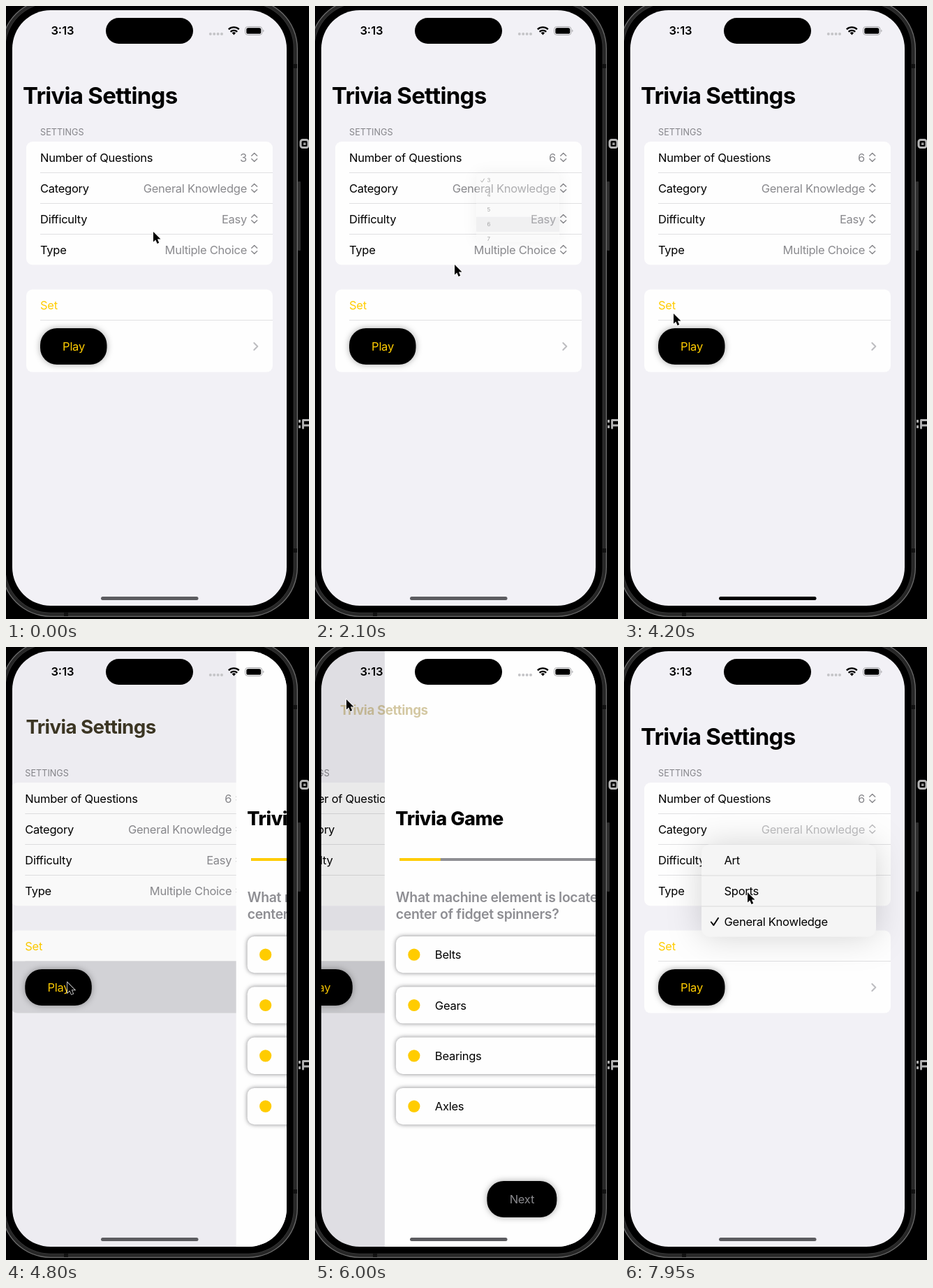
Recreate the animation shown at these times as an HTML page. Size 434x877 px, loop 8000 ms.

```html
<!DOCTYPE html>
<html lang="en">
<head>
<meta charset="utf-8">
<title>Trivia Settings</title>
<style>
  html, body { margin: 0; width: 100%; height: 100%; overflow: hidden; background: #000; }
  svg { display: block; width: 100vw; height: 100vh; }
  text {
    font: 400 16.5px Inter, "Open Sans", sans-serif;
    font-optical-sizing: none;
    letter-spacing: -.016em;
    white-space: pre;
  }
  .value, .muted { fill: #8a8a8e; }
  .accent { fill: #fc0; }
  .end { text-anchor: end; }
  .mid { text-anchor: middle; }
  .large { font-size: 33px; font-weight: 700; letter-spacing: -.022em; }
  .heading { font-size: 27px; font-weight: 800; }
  .question { font-size: 19.4px; font-weight: 600; fill: #8e8e93; }
  .caption { font-size: 12.6px; letter-spacing: .05px; fill: #85858a; }
  .clock { font-weight: 600; letter-spacing: 0; }
  .line { fill: none; stroke-linecap: round; stroke-linejoin: round; }
  .pill { filter: drop-shadow(0 0 5px rgba(0,0,0,.34)); }
  .answer { fill: #fefefe; filter: drop-shadow(0 0 3px rgba(100,100,104,.8)); }
  .plate { fill: #f5f5f5; filter: drop-shadow(0 0 24px rgba(0,0,0,.17)); }
</style>
</head>
<body>
<svg id="stage" viewBox="0 0 434 877"></svg>
<script>
const LOOP = 8000, STEP = 150;
const SCREEN = { x: 9, y: 6, w: 393, h: 852 };

// Markup helpers
const box = (x, y, w, h, r, fill, extra = '') =>
  `<rect x="${x}" y="${y}" width="${w}" height="${h}" rx="${r}" fill="${fill}" ${extra}/>`;
const text = (x, y, str, cls = '', extra = '') =>
  `<text x="${x}" y="${y}" class="${cls}" ${extra}>${str}</text>`;
const line = (d, color, width, extra = '') =>
  `<path class="line" d="${d}" stroke="${color}" stroke-width="${width}" ${extra}/>`;
const rule = (x, y, w, color = '#e0e0e2') => box(x, y, w, 1, 0, color);

const settingRow = (label, value, i) => {
  const y = 223 + i * 44;
  return text(49, y, label) +
    `<g id="value${i}">${text(345, y, value, 'value end')}` +
    line(`M351.8 ${y - 8.7}l3.9-3.8 3.9 3.8M351.8 ${y - 4.3}l3.9 3.8 3.9-3.8`, '#8a8a8e', 1.5) + '</g>' +
    (i ? rule(49, 194 + i * 44, 333) : '');
};

const answerRow = (label, i) => {
  const y = 414 + i * 72.3;
  return `<rect class="answer" x="25" y="${y}" width="361" height="52.3" rx="10"/>` +
    `<circle cx="51" cy="${y + 26.2}" r="8.6" fill="#fc0"/>` + text(81, y + 32.2, label);
};

const menu = (id, top, items, checked, pressed) => {
  const h = items.length * 44;
  const rows = items.map((item, i) => {
    const y = top + i * 44;
    return (i === pressed ? box(111, y, 250, 44, 0, '#d6d6da', `id="${id}Pressed"`) : '') +
      (i ? rule(111, y, 250, '#d9d9da') : '') +
      text(143.5, y + 28, item) +
      (i === checked ? line(`M124.8 ${y + 23}l3.6 4.6 6.6-10.4`, '#000', 1.9) : '');
  }).join('');
  return `<clipPath id="${id}Clip">${box(111, top, 250, h, 12, '#000')}</clipPath>` +
    `<g id="${id}"><rect class="plate" x="111" y="${top}" width="250" height="${h}" rx="12"/>` +
    `<g clip-path="url(#${id}Clip)">${rows}</g></g>`;
};

const phoneBody =
  box(418, 251, 4, 99, 1, '#2d2d2d') +
  box(-7, -10, 425, 884, 71, '#6c6c6c') +
  box(-5.7, -8.7, 422.4, 881.4, 69.7, '#272727') +
  box(-1.5, -4.5, 414, 873, 65, '#3a3a3a') +
  box(-.7, -3.7, 412.4, 871.4, 64, '#000') +
  box(412, 83, 5, 6, 0, '#111') + box(412, 776, 5, 6, 0, '#111') + box(83, 868, 6, 5, 0, '#111');

const backdropGlyphs =
  box(422, 191.5, 11, 11, 3, 'none', 'stroke="#b5b5b5" stroke-width="3"') +
  box(426, 195.5, 3.5, 3.5, 0, '#999') +
  box(419, 592, 3, 4, 0, '#aaa') + box(419, 600, 3, 4, 0, '#aaa') +
  line('M425.5 604v-11.5h10M425.5 600h10', '#b5b5b5', 2.8);

const settingsScreen =
  box(-120, 6, 640, 852, 0, '#f2f1f6') +
  text(49, 185, 'SETTINGS', 'caption') +
  box(29, 194, 353, 176.3, 9, '#fefefe') +
  settingRow('Number of Questions', '<tspan id="count">3</tspan>', 0) +
  settingRow('Category', 'General Knowledge', 1) +
  settingRow('Difficulty', 'Easy', 2) +
  settingRow('Type', 'Multiple Choice', 3) +
  `<clipPath id="card">${box(29, 405.5, 353, 118.3, 9, '#000')}</clipPath>` +
  box(29, 405.5, 353, 118.3, 9, '#fefefe') +
  `<g clip-path="url(#card)">${box(29, 449.5, 353, 75, 0, '#d6d6da', 'id="playRow"')}</g>` +
  rule(49, 449, 333) +
  text(49, 434, 'Set', 'accent', 'id="set"') +
  box(49, 461, 95.5, 52, 24, '#000', 'class="pill"') +
  text(97, 493, 'Play', 'accent mid') +
  line('M355.3 482l5 5-5 5', '#bdbdc1', 2);

const gameScreen =
  box(9, 6, 393, 852, 0, '#fefefe') +
  text(24.5, 255, 'Trivia Game', 'heading') +
  text(386, 251, '1 out of 6', 'end') +
  box(30.5, 302, 350.5, 4, 0, '#8e8e93') + box(30.5, 302, 58.4, 4, 0, '#fc0') +
  text(25, 365, 'What machine element is located in the', 'question') +
  text(25, 389, 'center of fidget spinners?', 'question') +
  ['Belts', 'Gears', 'Bearings', 'Axles'].map(answerRow).join('') +
  box(155.5, 764, 100, 52, 24, '#000', 'class="pill"') +
  text(205.5, 796, 'Next', 'muted mid');

const statusBar =
  text(81, 41, '3:13', 'clock mid') +
  box(143, 17, 125, 37, 18.5, '#000') +
  [292.8, 298.2, 303.6, 309].map(x => `<circle cx="${x}" cy="40" r="2" fill="#c4c4c7"/>`).join('') +
  '<g stroke-width="2.3" stroke="#000" fill="none"><path d="M318.8 33.4a11 11 0 0 1 15 0M321.6 36.8a7 7 0 0 1 9.6 0"/></g>' +
  '<path d="M323.7 38.6a4 4 0 0 1 5.4 0l-2.7 2.9z"/>' +
  box(342.5, 29.5, 24.5, 12, 4, 'none', 'stroke="#a8a8ab"') +
  box(344.3, 31.2, 21, 8.6, 2.6, '#000') +
  '<path d="M368.3 33.6q2.6 1.9 0 3.9z" fill="#a8a8ab"/>';

const stage = document.getElementById('stage');
stage.innerHTML =
  `<clipPath id="screen">${box(SCREEN.x, SCREEN.y, SCREEN.w, SCREEN.h, 55, '#000')}</clipPath>` +
  backdropGlyphs + phoneBody +
  '<g clip-path="url(#screen)">' +
    `<g id="settings">${settingsScreen}</g>` +
    box(9, 6, 393, 852, 0, '#000', 'id="dim"') +
    `<g id="game">${gameScreen}</g>` +
    `<g id="title">${text(0, 0, 'Trivia Settings', 'large')}</g>` +
    `<g id="back">${line('M27.8 73.5l-8 8.3 8 8.3', '#fc0', 2.4)}${text(38.5, 88, 'Trivia Settings', 'accent')}</g>` +
    menu('countMenu', 239, [3, 4, 5, 6, 7, 8, 9, 10], 0, 3) +
    menu('categoryMenu', 282.5, ['Art', 'Sports', 'General Knowledge'], 2) +
    statusBar +
    box(136, 845, 139.5, 5, 2.5, '#000', 'id="home"') +
  '</g>' +
  '<path id="cursor" d="M0 0v14.6l3.3-3.1 2.3 5.4 2.6-1.1-2.3-5.3h4.6z" stroke="#fff" stroke-width="1.4" paint-order="stroke"/>';

const ui = Object.fromEntries([...stage.querySelectorAll('[id]')].map(el => [el.id, el]));

// Pointer path: time, x, y
const pointer = [
  [0, 211, 323], [150, 190, 385], [300, 168, 430], [450, 149, 370], [600, 185, 290],
  [750, 235, 240], [900, 253, 224], [1200, 253, 224], [1500, 230, 300], [1800, 200, 370],
  [2100, 200, 370], [2400, 140, 400], [2700, 85, 423], [3000, 64, 428], [3150, 64, 428],
  [3300, 67, 440], [3450, 66, 416], [3600, 66, 416], [4200, 71, 440], [4500, 86, 476],
  [4650, 88, 482], [4800, 88, 480], [4950, 90, 410], [5100, 88, 270], [5250, 84, 178],
  [5400, 68, 118], [5700, 45, 76], [6000, 45, 75], [6150, 90, 110], [6300, 190, 190],
  [6450, 270, 255], [6600, 291, 270], [6900, 291, 270], [7050, 286, 274], [7350, 232, 320],
  [7650, 186, 347], [7800, 177, 350], [7950, 177, 351]
];

const lerp = (a, b, p) => a + (b - a) * p;

// Critically damped spring, 0 to 1, time in ms
const spring = (ms, rate) => {
  if (ms <= 0) return 0;
  const x = ms / 1000 * rate, p = 1 - (1 + x) * Math.exp(-x);
  return p > .985 ? 1 : p;
};

const pointerAt = t => {
  const i = Math.max(1, pointer.findIndex(k => k[0] >= t));
  const [a, b] = [pointer[i - 1], pointer[i]];
  const p = (t - a[0]) / (b[0] - a[0]);
  return [lerp(a[1], b[1], p), lerp(a[2], b[2], p)];
};

function showMenu(id, top, height, open, opacity) {
  const el = ui[id], scale = lerp(.2, 1, open);
  el.style.display = open > 0 ? '' : 'none';
  el.setAttribute('opacity', opacity);
  el.setAttribute('transform', `translate(340 ${top}) scale(${scale}) translate(-340 ${-top})`);
  for (const r of [el.firstChild, ui[id + 'Clip'].firstChild])
    r.setAttribute('height', height * Math.sqrt(open));
}

function showNavigation(p, t) {
  const edge = SCREEN.w * (1 - p), shrink = p ** .7;
  ui.settings.setAttribute('transform', `translate(${-118 * p} 0)`);
  ui.dim.setAttribute('opacity', .1 * p);
  ui.game.style.display = p ? '' : 'none';
  ui.game.setAttribute('transform', `translate(${edge} 0)`);
  ui.title.setAttribute('transform',
    `translate(${lerp(24, 38.5, shrink)} ${lerp(140, 88, shrink)}) scale(${lerp(1, .48, shrink)})`);
  ui.title.setAttribute('fill', `rgb(${200 * p} ${165 * p} ${50 * p})`);
  ui.title.setAttribute('opacity', (1 - p) ** .6);
  const pressed = t >= 5850 && t < 6000;
  ui.back.setAttribute('opacity', pressed ? .4 : Math.max(0, 5 * p - 4));
}

function draw(t) {
  const [x, y] = pointerAt(t);
  ui.cursor.setAttribute('transform', `translate(${x} ${y})`);

  const closing = t > 1960;
  const countOpen = closing ? 1 - spring(t - 1960, 16) : spring(t - 1170, 16);
  showMenu('countMenu', 239, 352, countOpen, closing ? countOpen : Math.min(1, 3 * countOpen));
  ui.countMenuPressed.style.display = closing ? '' : 'none';
  ui.count.textContent = closing ? 6 : 3;
  ui.value0.setAttribute('opacity', closing ? 1 : 1 - .45 * countOpen);

  const categoryOpen = spring(t - 6870, 16);
  showMenu('categoryMenu', 282.5, 132, categoryOpen, Math.min(1, 3 * categoryOpen));
  ui.value1.setAttribute('opacity', 1 - .45 * categoryOpen);

  const leaving = t > 5930;
  const pushed = leaving ? 1 - spring(t - 5930, 13) : spring(t - 4740, 13);
  showNavigation(pushed, t);
  ui.playRow.setAttribute('opacity', leaving ? Math.min(1, 1.25 * pushed) : t >= 4650 ? 1 : 0);

  ui.set.setAttribute('opacity', t >= 3300 && t < 3450 ? .35 : 1);
  ui.home.setAttribute('fill', t >= 2700 && t < 4800 ? '#000' : '#5c5c60');
}

function tick() {
  const t = performance.now() % LOOP;
  draw(Math.floor(t / STEP) * STEP);
  requestAnimationFrame(tick);
}
tick();
</script>
</body>
</html>
```
